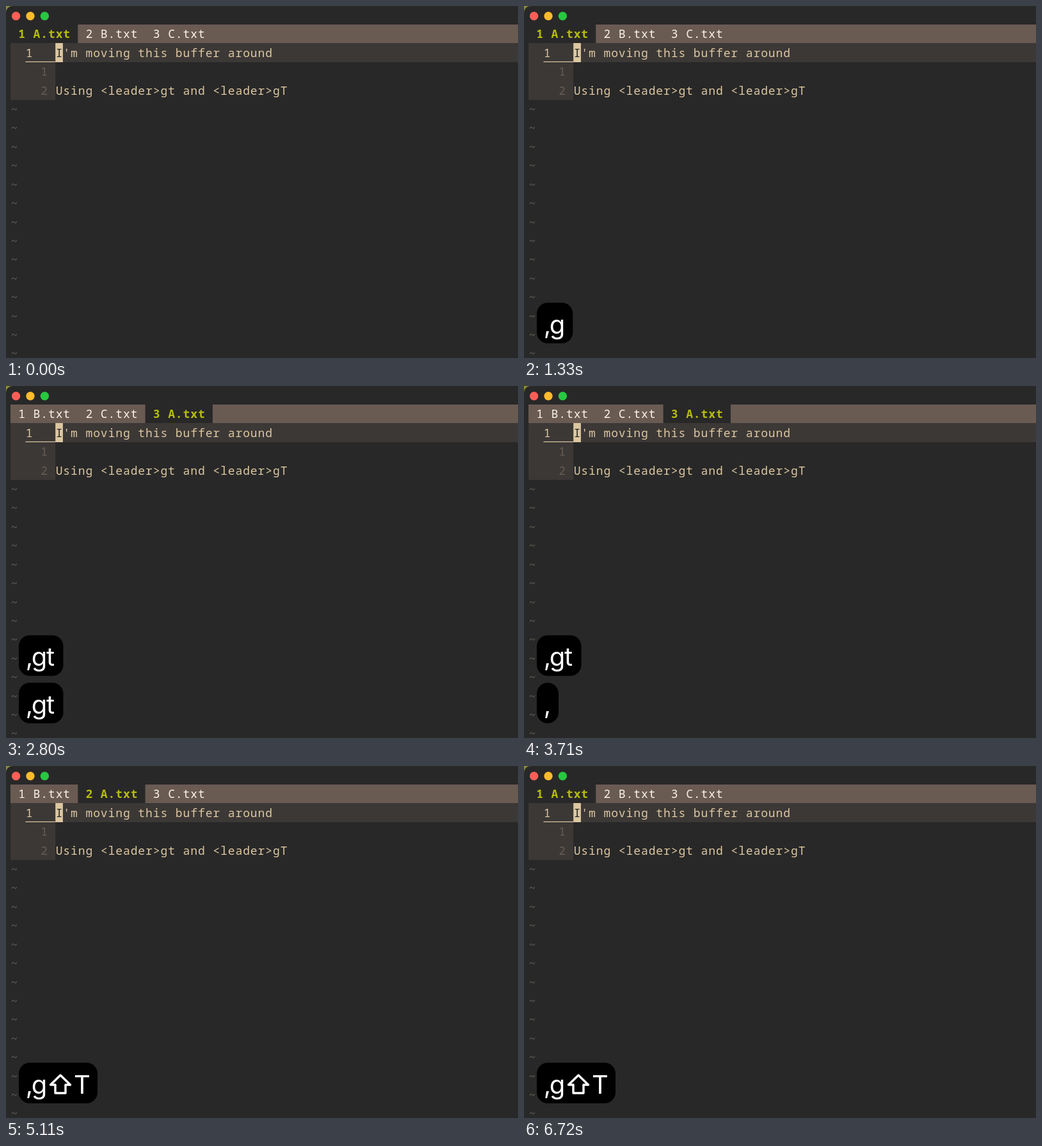
These frames come from a looping animation (800x551 px, 6790 ms). An HTML page with a canvas:

```html
<!DOCTYPE html>
<html lang="en">
<head>
<meta charset="utf-8">
<title>Moving a buffer</title>
<style>
  html, body { margin: 0; width: 100%; height: 100%; overflow: hidden; background: #282828; }
  canvas { display: block; width: 800px; height: 551px; }
</style>
</head>
<body>
<canvas id="stage" width="800" height="551"></canvas>
<script>
const ctx = document.getElementById("stage").getContext("2d");
const LOOP = 6790, TICK = 70;
const LEFT = 7, TOP = 29, CELL = 11.7, ROW = 29.42;
const MONO = '"Noto Sans Mono", "DejaVu Sans Mono", monospace';
const SANS = 'Inter, Roboto, sans-serif';
const C = {
  bg: "#282828", bar: "#6a5b52", line: "#3c3836", gutter: "#3c3836",
  text: "#dcc7a1", tab: "#fbf3ea", active: "#b6bd0c", dim: "#665c54", tilde: "#625c55"
};

// Tab order from each moment on
const orders = [[0, "ABC"], [1470, "BAC"], [2590, "BCA"], [4130, "BAC"], [5880, "ABC"]];

// Typed chords: when each key shows up, and when the label starts to fade
const FADE = 210;
const chords = [
  { keys: ",gt", at: [1190, 1260, 1400], out: 3400 },
  { keys: ",gt", at: [2240, 2380, 2520], out: 4600 },
  { keys: ",gT", at: [3710, 3850, 4060], out: 6160 },
  { keys: ",gT", at: [5390, 5530, 5740], out: LOOP }
];
const BADGE = { x: 20, y: 464.5, h: 63.5, step: 74.3 };
const glyphX = { ",": 36.5, g: 52, t: 69.5, T: 119 };
const endX = { ",": 54, g: 76.3, t: 89.5, T: 143 };

const colX = col => LEFT + col * CELL;
const rowY = row => Math.round(TOP + row * ROW);

function box(x, y, w, h, color) {
  ctx.fillStyle = color;
  ctx.fillRect(x, y, w, h);
}

function put(str, col, row, color, weight = 400) {
  ctx.font = `${weight} 18px ${MONO}`;
  ctx.textAlign = "center";
  ctx.fillStyle = color;
  const y = TOP + row * ROW + 21.3;
  [...str].forEach((ch, i) => ctx.fillText(ch, colX(col + i + 0.5), y));
}

function drawWindow() {
  box(0, 0, 800, 551, "#8d8b35");
  ctx.fillStyle = C.bg;
  ctx.beginPath();
  ctx.roundRect(0, 0, 820, 580, 10);
  ctx.fill();
  ["#ff5f57", "#febc2e", "#28c840"].forEach((color, i) => {
    ctx.fillStyle = color;
    ctx.beginPath();
    ctx.arc(15.6 + i * 22.4, 15.8, 6.7, 0, Math.PI * 2);
    ctx.fill();
  });
}

function drawTabs(t) {
  const order = orders.filter(o => t >= o[0]).pop()[1];
  box(LEFT, rowY(0), 800 - LEFT, rowY(1) - rowY(0), C.bar);
  [...order].forEach((name, i) => {
    const on = name === "A";
    if (on) box(colX(i * 9), rowY(0), CELL * 9, rowY(1) - rowY(0), C.bg);
    put(`${i + 1} ${name}.txt`, i * 9 + 1, 0, on ? C.active : C.tab, on ? 700 : 400);
  });
}

function drawBuffer(t) {
  const y = rowY(1), h = rowY(2) - y;
  box(LEFT, y, 800 - LEFT, h, C.line);
  box(LEFT, rowY(2), CELL * 6, rowY(4) - rowY(2), C.gutter);
  box(colX(2), y + h - 1.2, CELL * 4, 1.2, C.text);

  put("1", 2, 1, C.text);
  put("1", 4, 2, C.dim);
  put("2", 4, 3, C.dim);
  put("I'm moving this buffer around", 6, 1, C.text);
  put("Using <leader>gt and <leader>gT", 6, 3, C.text);

  const hidden = t >= 5810 && t < 5880;
  if (!hidden) {
    box(colX(6), y, CELL, h, C.text);
    put("I", 6, 1, C.bg);
  }
  for (let row = 4; row < 18; row++) put("~", 0, row, C.tilde);
}

function drawShift(dy) {
  const outline = [[85, 484], [100.5, 499], [93, 499], [93, 512], [77, 512], [77, 499], [69.5, 499]];
  ctx.beginPath();
  outline.forEach(([x, y]) => ctx.lineTo(x, y + dy));
  ctx.closePath();
  ctx.strokeStyle = "#fff";
  ctx.lineWidth = 3.4;
  ctx.lineJoin = "round";
  ctx.stroke();
}

function drawBadge(keys, level, alpha) {
  const dy = -level * BADGE.step;
  ctx.globalAlpha = alpha;
  ctx.fillStyle = "#000";
  ctx.beginPath();
  ctx.roundRect(BADGE.x, BADGE.y + dy, endX[keys[keys.length - 1]] - BADGE.x, BADGE.h, 17);
  ctx.fill();
  ctx.font = `400 40px ${SANS}`;
  ctx.textAlign = "center";
  for (const key of keys) {
    if (key === "T") drawShift(dy);
    ctx.fillStyle = "#fff";
    ctx.fillText(key, glyphX[key], 512.5 + dy);
  }
  ctx.globalAlpha = 1;
}

function drawChords(t) {
  const shown = chords.filter(c => t >= c.at[0]);
  shown.forEach((c, i) => {
    const alpha = Math.min(1, 1 - (t - c.out) / FADE);
    if (alpha <= 0) return;
    const count = c.at.filter(at => t >= at).length;
    drawBadge(c.keys.slice(0, count), shown.length - 1 - i, alpha);
  });
}

function frame() {
  const t = Math.floor((performance.now() % LOOP) / TICK) * TICK;
  drawWindow();
  drawTabs(t);
  drawBuffer(t);
  drawChords(t);
  requestAnimationFrame(frame);
}
frame();
</script>
</body>
</html>
```
